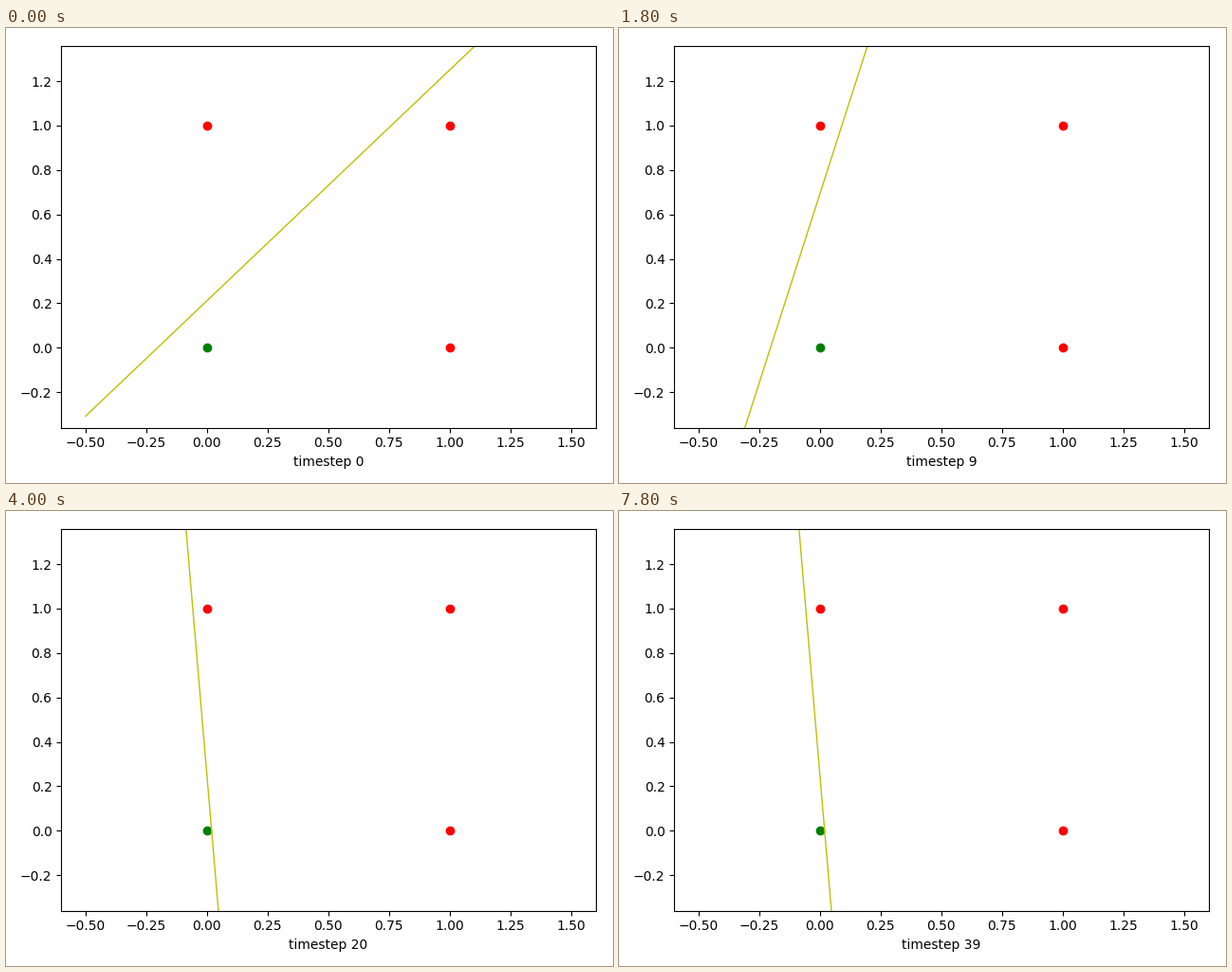
Animation, 640 px wide and 480 px high, one loop 8 s. Source, as a matplotlib script:

```python
import numpy as np
import matplotlib.pyplot as plt
from matplotlib.animation import FuncAnimation

WIDTH, HEIGHT, DPI = 640, 480, 100
STEPS = 40
MARGIN = 18.5            # pixels free above and to the right of the axes
RATE = 0.0743            # learning rate relative to the fixed x weight
TILT, SHIFT = 0.9625, -0.2035


def boundary(step):
    """Train for some epochs; the boundary is x = tilt * y + shift."""
    tilt, shift = TILT, SHIFT
    for _ in range(step):
        if tilt + shift > 0:      # (0, 1) is on the wrong side
            tilt -= RATE
            shift -= RATE
        if shift < 0:             # (0, 0) is on the wrong side
            shift += RATE
    return tilt, shift


fig, ax = plt.subplots(figsize=(WIDTH / DPI, HEIGHT / DPI), dpi=DPI)
ax.plot([0, 1, 1], [1, 0, 1], "ro")
ax.plot([0], [0], "go")
xs = np.array([-0.5, 1.5])
line, = ax.plot(xs, xs, "y-", linewidth=1)
ax.set_xlim(-0.6, 1.6)
ax.set_ylim(-0.36, 1.36)
ax.set_xlabel("timestep 0")
fig.tight_layout()
fig.subplots_adjust(right=1 - MARGIN / WIDTH, top=1 - MARGIN / HEIGHT)


def update(step):
    tilt, shift = boundary(step)
    line.set_ydata((xs - shift) / tilt)
    ax.set_xlabel(f"timestep {step}")
    return line, ax


anim = FuncAnimation(fig, update, frames=STEPS, interval=200,
                     repeat=True, repeat_delay=0)
plt.show()
```
